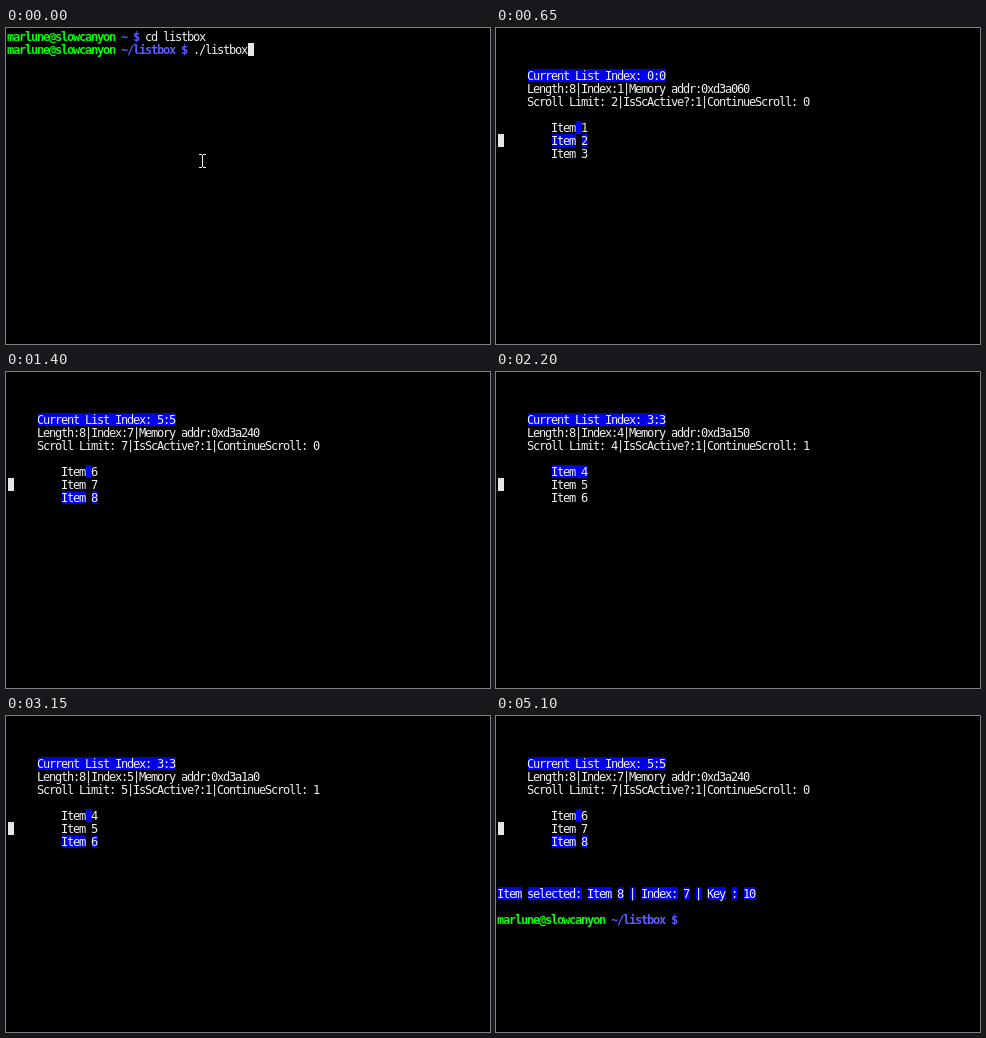
Animation of 484 by 316 pixels, one loop 5700 ms. Source, as an HTML page:

```html
<!DOCTYPE html>
<html lang="en">
<head>
<meta charset="utf-8">
<title>List box in a terminal</title>
<style>
  html, body { margin: 0; width: 100%; height: 100%; overflow: hidden; background: #000; }
  #screen { position: relative; width: 484px; height: 316px; overflow: hidden; }
  /* Glyphs sit at the left of their 6px cells */
  #screen span {
    position: absolute;
    height: 13px;
    padding-right: 1px;
    text-indent: -1px;
    font: 12px/14px "DejaVu Sans Mono", monospace;
    letter-spacing: calc(6px - 1ch);
    white-space: pre;
    color: #f2f2f2;
  }
  #screen .mark { background: #0000ee; }
  #screen .block { background: #e5e5e5; }
  #screen .user { color: #00ff00; font-weight: bold; }
  #screen .path { color: #5c5cff; font-weight: bold; }
  #pointer { position: absolute; left: 0; top: 0; fill: none; stroke: #f2f2f2; }
</style>
</head>
<body>
<div id="screen"></div>
<script>
const LOOP = 5700;
const CELL = { w: 6, h: 13, pad: 2 };
const LAST = 7, ROWS = 3;
const screen = document.getElementById("screen");

// [time, direction, selected item]
const steps = [
  [100, "start", 0],
  [650, "down", 1], [750, "down", 2], [950, "down", 3], [1050, "down", 4],
  [1150, "down", 5], [1350, "down", 6], [1400, "down", 7],
  [1950, "up", 6], [2050, "up", 5], [2100, "up", 4], [2200, "up", 3],
  [2250, "up", 2], [2350, "up", 1], [2450, "up", 0],
  [2850, "down", 1], [2950, "down", 2], [3000, "down", 3], [3100, "down", 4],
  [3150, "down", 5], [3250, "down", 6], [3450, "down", 7]
];
const CHOSEN = 3750;

// [time, x, y] of the mouse pointer; no place means hidden
const moves = [[0, 196, 133], [100], [4000, 196, 133], [4050, 236, 134], [4100, 285, 136], [4150]];

const at = (table, t) => table.filter(row => row[0] <= t).pop();

function put(row, col, text, cls = "") {
  const x = CELL.pad + col * CELL.w, y = CELL.pad + row * CELL.h;
  return `<span class="${cls}" style="left:${x}px;top:${y}px">${text}</span>`;
}

// Highlights each word, leaving the gaps plain
const words = (row, col, text) =>
  [...text.matchAll(/\S+/g)].map(m => put(row, col + m.index, m[0], "mark")).join("");

const prompt = (row, path) =>
  put(row, 0, "marlune@slowcanyon", "user") + put(row, 19, path + " $", "path");

function shell() {
  return prompt(0, "~") + put(0, 23, "cd listbox") +
    prompt(1, "~/listbox") + put(1, 31, "./listbox") + put(1, 40, " ", "block");
}

function info(dir, item, top) {
  const rising = dir === "up" && item < LAST - ROWS + 1;
  const index = rising ? item + 1 : item;
  const limit = rising ? index : top + ROWS - 1;
  const more = dir === "up" ? rising && item > 0 : top > 0 && item < LAST;
  const addr = (0xd3a010 + index * 0x50).toString(16);
  return put(4, 5, `Length:8|Index:${index}|Memory addr:0x${addr}`) +
    put(5, 5, `Scroll Limit: ${limit}|IsScActive?:1|ContinueScroll: ${+more}`);
}

function list(dir, item) {
  const top = dir === "up" ? Math.min(item, LAST - ROWS + 1) : Math.max(0, item - ROWS + 1);
  let html = put(3, 5, `Current List Index: ${top}:${top}`, "mark") + put(8, 0, " ", "block");
  if (dir !== "start") html += info(dir, item, top);
  for (let i = 0; i < ROWS; i++) {
    const label = `Item ${top + i + 1}`;
    if (i === 0) html += put(7, 13, " ", "mark");
    html += top + i === item ? words(7 + i, 9, label) : put(7 + i, 9, label);
  }
  return html;
}

const result = () =>
  words(13, 0, "Item selected: Item 8 | Index: 7 | Key : 10") + prompt(15, "~/listbox");

function pointer([, x, y]) {
  if (x === undefined) return "";
  return `<svg id="pointer" width="484" height="316"><path transform="translate(${x} ${y})"
    d="M-3 -6.5h3M1 -6.5h3M.5 -6v12M-3 6.5h3M1 6.5h3"/></svg>`;
}

let shown = "";
function draw(t) {
  const step = at(steps, t);
  const html = (step ? list(step[1], step[2]) : shell()) +
    (t >= CHOSEN ? result() : "") + pointer(at(moves, t));
  if (html !== shown) screen.innerHTML = shown = html;
}

const start = performance.now();
function tick() {
  draw((performance.now() - start) % LOOP);
  requestAnimationFrame(tick);
}
tick();
</script>
</body>
</html>
```
